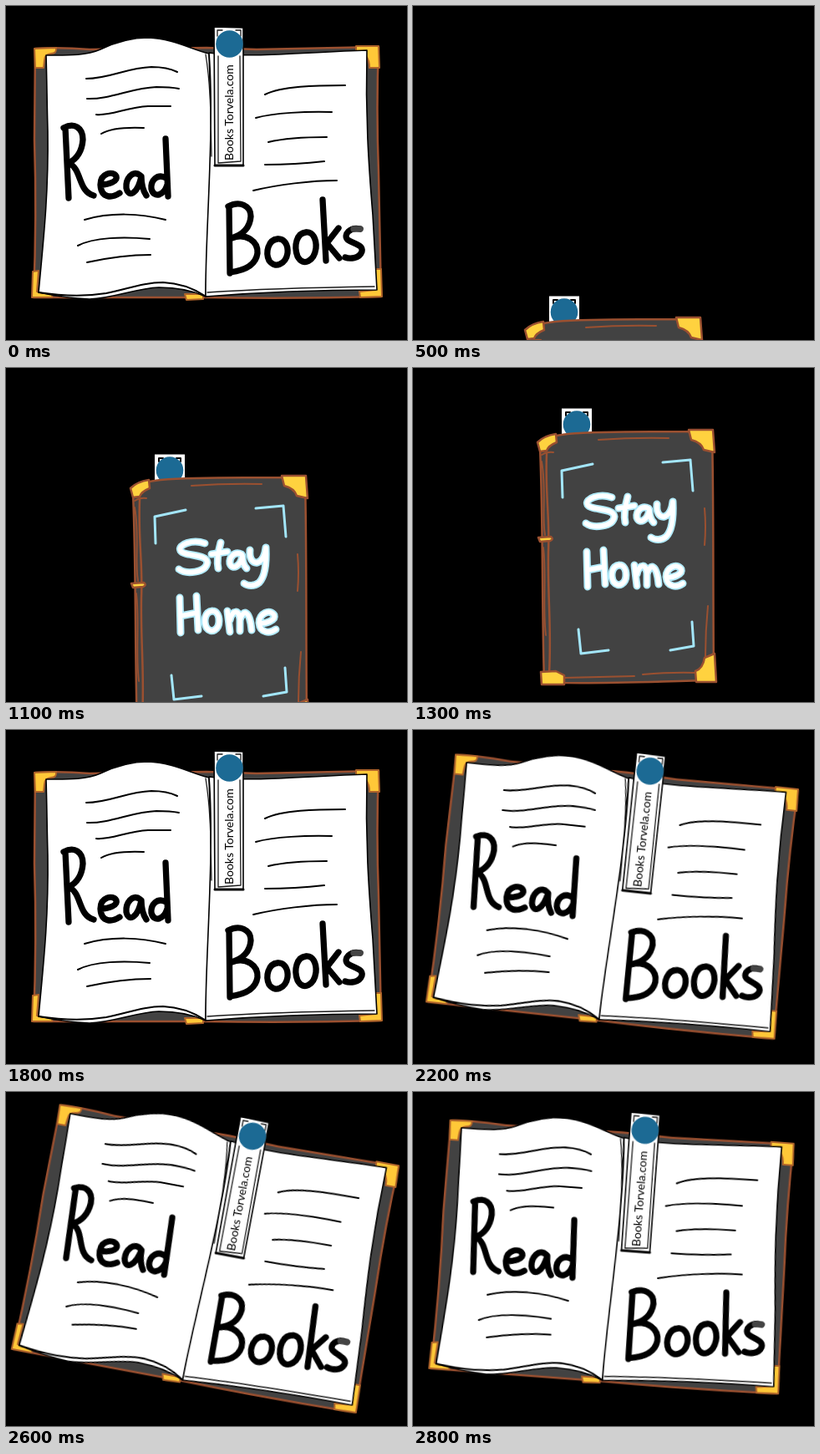
An HTML page for the animation above (3000 ms loop, 480 by 400 pixels).

```html
<!DOCTYPE html>
<html lang="en">
<head>
<meta charset="utf-8">
<title>Stay home, read books</title>
<style>
  html, body { margin: 0; width: 100%; height: 100%; overflow: hidden; background: #000; }
  svg { display: block; width: 480px; height: 400px; }
  path { fill: none; stroke-linecap: round; stroke-linejoin: round; }

  .ink path, path.ink { stroke: #000; stroke-width: 2; }
  .thin path, path.thin { stroke: #1a1a1a; stroke-width: 1.3; }
  .big path { stroke: #000; stroke-width: 7.3; }
  .trim path, path.trim { stroke: #9b5030; stroke-width: 2.5; }
  .neon path { stroke: #a3e6fa; stroke-width: 3; }
  .halo { stroke: #b2ebfb; stroke-width: 9; }
  .core { stroke: #fff; stroke-width: 5.6; }
  path.board { fill: #424242; }
  path.page { fill: #fff; stroke-width: 1.6; }
  .gold path { fill: #ffc838; stroke: #b0642a; stroke-width: 2; }
  .bright path { fill: #ffd23f; stroke: #9b5030; stroke-width: 2.5; }
  .tag { font: 14px Lato, "Open Sans", sans-serif; fill: #000; }
  .badge { fill: #1c6a94; }

  .open, .closed { animation: 3s step-end infinite; }
  .open { transform-origin: 241px 198px; animation-name: sway; }
  .closed { visibility: hidden; animation-name: rise; }

  @keyframes sway {
    0% { visibility: visible; transform: none; }
    16.66% { visibility: hidden; transform: none; }
    60% { visibility: visible; transform: none; }
    66.66% { visibility: visible; transform: rotate(-6deg); }
    73.33% { visibility: visible; transform: rotate(6.2deg); }
    80% { visibility: visible; transform: rotate(-5.4deg); }
    86.66% { visibility: visible; transform: rotate(10.6deg); }
    93.33%, 100% { visibility: visible; transform: translate(-1px, -2px) rotate(4.3deg); }
  }
  @keyframes rise {
    0% { visibility: hidden; transform: none; }
    16.66% { visibility: visible; transform: translate(-15px, 299px); }
    20% { visibility: visible; transform: translate(-11px, 261px); }
    23.33% { visibility: visible; transform: translate(-7px, 223px); }
    26.66% { visibility: visible; transform: translate(-4px, 185px); }
    30% { visibility: visible; transform: translate(0, 147px); }
    33.33% { visibility: visible; transform: translate(0, 101px); }
    36.66% { visibility: visible; transform: translate(0, 55px); }
    43.33% { visibility: visible; transform: none; }
    60%, 100% { visibility: hidden; transform: none; }
  }
</style>
</head>
<body>
<svg viewBox="0 0 480 400">
  <defs>
    <g id="stay-home">
      <path d="M238 155C224 150 205 156 209 164C214 171 240 167 241 178C239 191 215 192 207 186"/>
      <path d="M257 154C254 165 252 176 254 185M246 168L265 165"/>
      <path d="M282 168C273 164 267 172 268 179C271 188 281 182 283 170C283 177 285 182 288 185"/>
      <path d="M292 163C291 173 295 179 301 178C307 176 310 169 311 160C312 180 310 195 303 202C297 207 289 206 285 203"/>
      <path d="M208 220L209 262M228 218L230 259M209 242L229 238"/>
      <path d="M247 236C238 237 236 248 240 256C246 264 255 258 255 248C255 241 252 236 247 236"/>
      <path d="M265 236L268 261M268 247C271 234 279 234 280 246L280 260M280 247C284 233 292 235 294 259"/>
      <path d="M304 251C312 251 323 247 321 241C316 233 303 239 303 250C304 263 316 263 323 258"/>
    </g>
  </defs>

  <g class="open">
    <path class="board trim" d="M35 51Q65 49 100 52L240 50L300 52L446 49Q443 120 446 200L449 348Q340 351 236 349L140 349L33 349Q37 250 34 160Z"/>
    <g class="gold">
      <path d="M34 51L60 50Q61 57 54 57Q46 58 46 65L45 74L35 74Z"/>
      <path d="M419 48L446 48L447 74L435 74Q435 56 419 54Z"/>
      <path d="M32 318L39 317L37 342L56 344L55 349L31 349Z"/>
      <path d="M442 315L449 315L450 348L424 349L423 342L442 340Z"/>
      <path d="M214 345L236 345L236 351L216 352Z"/>
    </g>

    <path class="page ink" d="M48 59C72 59 95 60 113 52C130 44 150 38 170 38C200 39 222 52 243 57L246 150L239 348C222 340 200 337 183 337C155 338 130 350 100 351C76 350 58 347 39 343C46 270 51 220 50 150C49 115 49 90 48 59Z"/>
    <path class="page ink" d="M243 56C290 63 360 55 432 53C430 130 434 190 439 250L444 340C370 340 300 343 239 348C238 280 250 150 243 56Z"/>
    <path class="ink" d="M39 343C65 347 95 348 120 344C148 338 166 331 188 331C212 332 227 340 238 347"/>
    <g class="thin">
      <path d="M239 58C245 95 245 130 246 180"/>
      <path d="M241 343C300 339 375 337 441 336"/>
    </g>

    <g class="ink">
      <path d="M96 87C124 87 144 74 174 73C189 73 199 76 205 79"/>
      <path d="M97 111C125 112 150 98 180 97C195 97 202 98 207 99"/>
      <path d="M108 130C125 132 145 121 170 120L197 120"/>
      <path d="M114 153C124 147 142 145 165 146"/>
      <path d="M94 256C125 247 160 248 191 256"/>
      <path d="M86 287C105 277 140 276 172 279"/>
      <path d="M97 307C120 302 150 298 173 298"/>
      <path d="M310 106C330 96 370 95 406 95"/>
      <path d="M299 134C320 128 360 126 390 127"/>
      <path d="M314 163C335 158 365 157 384 157"/>
      <path d="M310 190C330 190 355 189 381 186"/>
      <path d="M296 221C325 214 365 209 396 209"/>
    </g>

    <g class="big" role="img" aria-label="Read Books">
      <path d="M71 146L75 230M69 146C82 139 92 146 92 160C91 174 85 183 75 188C91 195 86 222 105 227"/>
      <path d="M114 214C123 214 134 210 132 204C128 197 113 200 113 214C114 231 127 230 136 224"/>
      <path d="M161 203C151 195 143 208 144 218C147 231 158 224 162 204C162 215 164 221 168 227"/>
      <path d="M192 206C181 200 173 209 174 219C177 231 189 227 193 214M191 159L194 228"/>
      <path d="M267 240L268 320M266 240C280 233 293 239 293 252C292 266 283 274 270 278C287 271 302 282 301 296C299 311 284 317 268 319"/>
      <path d="M325 279C314 280 310 295 315 305C322 315 335 309 337 296C338 286 333 278 325 279"/>
      <path d="M359 271C348 272 344 287 349 300C356 313 369 305 371 290C372 279 367 270 359 271"/>
      <path d="M379 232L383 305M398 266L384 284L399 302"/>
      <path d="M424 267C412 264 403 274 409 280C416 285 428 286 426 294C423 303 411 303 406 301"/>
      <path d="M416 267L424 267" style="stroke:#444"/>
    </g>

    <path class="page ink" d="M249 25L284 26L284 191L250 191Z"/>
    <path class="ink" d="M250 191L284 191" style="stroke-width:3"/>
    <path class="thin" d="M254 60L254 188L281 186L280 60M253 36L253 29L259 29M275 29L281 29L281 36"/>
    <circle class="badge" cx="267.5" cy="45.5" r="16.3"/>
    <text class="tag" transform="translate(272 185) rotate(-90)">Books Torvela.com</text>
  </g>

  <g class="closed">
    <path d="M178 48.500L214 48.500L214 86L178 86Z" style="fill:#fff"/>
    <path class="ink" d="M183 57L183 53L188 53M204 53L209 53L209 57"/>
    <circle class="badge" cx="196" cy="67.500" r="16.3"/>

    <path class="board trim" d="M152 95C155 85 165 81 185 79C235 75 285 77 335 76L358 78C360 160 359 250 360 374C300 375 240 378 180 377L157 376C154 280 156 190 152 95Z"/>
    <g class="trim">
      <path d="M160 103C158 150 164 180 162 220C161 275 166 310 163 366"/>
      <path d="M154 112C160 145 154 175 158 200M156 215C160 245 155 285 159 320" style="stroke-width:1.8"/>
      <path d="M154 104Q160 100 168 101M222 86Q265 83 306 84" style="stroke-width:2"/>
      <path d="M349 168Q351 190 349 212M353 285Q350 315 350 345" style="stroke-width:2"/>
      <path d="M181 371Q225 370 265 369M275 367Q310 364 338 365" style="stroke-width:2"/>
    </g>
    <g class="bright">
      <path d="M149 89Q157 81 171 79L172 89Q162 93 160 99L152 100Z"/>
      <path d="M330 74L359 74L361 101L348 98Q345 89 333 86Z"/>
      <path d="M361 342L349 347Q347 360 338 363L339 376L363 376Z"/>
      <path d="M153 364L171 363L181 368L181 379L154 379Z"/>
      <path d="M150 203L165 202Q169 205 164 207L152 208Z"/>
    </g>
    <g class="neon">
      <path d="M179 155L178 123L215 115"/>
      <path d="M299 113L332 110L335 147"/>
      <path d="M198 313L201 342L234 338"/>
      <path d="M334 304L336 333L308 338"/>
    </g>
    <g role="img" aria-label="Stay Home">
      <use class="halo" href="#stay-home"/>
      <use class="core" href="#stay-home"/>
    </g>
  </g>
</svg>
</body>
</html>
```
